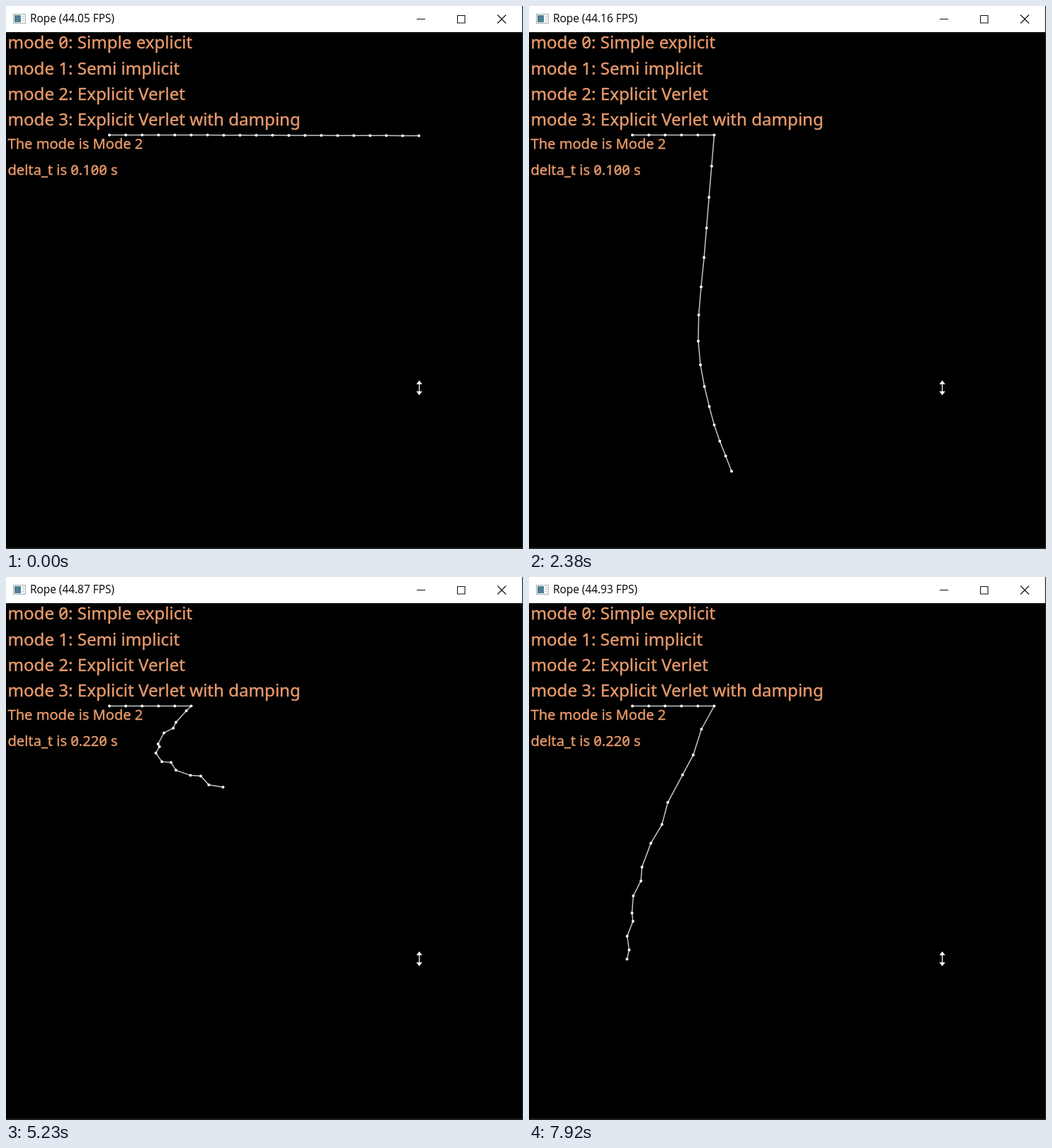
These frames come from a looping animation (730x768 px, 8 s). An HTML page:

```html
<!DOCTYPE html>
<html lang="en">
<head>
<meta charset="utf-8">
<title>Rope</title>
<style>
  html, body { margin: 0; width: 100%; height: 100%; overflow: hidden; background: #000; }
  svg { display: block; }
  text { white-space: pre; }
  .title { font: 15.4px "Open Sans", sans-serif; fill: #000; }
  .osd {
    font-family: "Noto Sans", sans-serif; font-variant-numeric: slashed-zero;
    fill: #ea9b6c; stroke: #ea9b6c; stroke-width: 0.35;
  }
  .big { font-size: 24.1px; }
  .small { font-size: 20.1px; }
</style>
</head>
<body>
<svg width="730" height="768" viewBox="0 0 730 768">
  <rect width="730" height="768"/>
  <rect width="729" height="37" fill="#fff"/>
  <path d="M729.5 0V768M0 767H730" fill="none" stroke="#2b2b2b" stroke-width="1.5"/>

  <rect x="10.5" y="11.5" width="17" height="13" fill="#f4f6f7" stroke="#a9b0b4"/>
  <rect x="12" y="13" width="9" height="10" fill="#4f7f92"/>
  <path d="M23 14.5h3M23 17.5h3M23 20.5h3" stroke="#c3c9cc"/>
  <text class="title" id="title" x="34" y="23"></text>
  <path d="M580 18.5h12M637.5 13.5h10.5v10.5h-10.5zM694 12.5l12 12M706 12.5l-12 12"
        fill="none" stroke="#111" stroke-width="1.1"/>

  <g class="osd big">
    <text x="2.5" y="60">mode 0: Simple explicit</text>
    <text x="2.5" y="96.5">mode 1: Semi implicit</text>
    <text x="2.5" y="132.7">mode 2: Explicit Verlet</text>
    <text x="2.5" y="169">mode 3: Explicit Verlet with damping</text>
  </g>
  <g class="osd small">
    <text x="2.5" y="202">The mode is Mode 2</text>
    <text id="delta" x="2.5" y="238.5"></text>
  </g>

  <path id="rope" fill="none" stroke="#bcc8c5" stroke-width="1.5"/>
  <path id="masses" fill="none" stroke="#fff" stroke-width="4" stroke-linecap="round"/>
  <path d="M583.5 532v16M580.5 534.5l3-4 3 4zM580.5 545.5l3 4 3-4z"
        fill="#fff" stroke="#fff" stroke-width="1.2"/>
</svg>

<script>
const LOOP = 8000, FPS = 13, FREE = 14;
const PIN = [261.5, 182.5];
const fixed = Array.from({ length: 5 }, (_, i) => [146 + 23.1 * i, PIN[1]]);

// Key shapes: step number, then evenly spaced points from the pin to the free end.
const poses = [
  [-1, [584, 182.5]],
  [0, [583, 183.5]],
  [13, [348, 267], [421, 283], [489, 283]],
  [22, [312, 385], [429, 431]],
  [31, [249, 335], [239, 474], [258, 580], [286, 658]],
  [44, [222, 449], [144, 648], [65, 741]],
  [57, [148, 410], [118, 598]],
  [66, [195, 262], [272, 325]],
  [80, [308, 285], [387, 341], [460, 356]],
  [84, [335, 370], [492, 425]],
  [88, [300, 440], [391, 590]],
  [97, [182, 440], [152, 672]],
  [103, [162, 407], [137, 544]],
].map(([step, ...points]) => ({ step, nodes: spread([PIN, ...points]) }));

function hermite(a, b, ta, tb, u) {
  const v = 1 - u;
  return a * v * v * (1 + 2 * u) + b * u * u * (3 - 2 * u) + ta * u * v * v - tb * u * u * v;
}

// Samples a smooth curve through the points at every free mass.
function spread(points) {
  const n = points.length - 1;
  const at = (i, axis) =>
    i < 0 ? 2 * points[0][axis] - points[1][axis] :
    i > n ? 2 * points[n][axis] - points[n - 1][axis] : points[i][axis];
  return Array.from({ length: FREE + 1 }, (_, i) => {
    const s = i / FREE * n, j = Math.min(Math.floor(s), n - 1);
    return [0, 1].map(axis => {
      const [p, a, b, q] = [-1, 0, 1, 2].map(k => at(j + k, axis));
      return hermite(a, b, (b - p) / 2, (q - a) / 2, s - j);
    });
  });
}

function velocity(k, node, axis) {
  const slope = i => (poses[i + 1].nodes[node][axis] - poses[i].nodes[node][axis]) /
                     (poses[i + 1].step - poses[i].step);
  if (k === 0) return slope(0);
  if (k === poses.length - 1) return slope(k - 1);
  const before = poses[k].step - poses[k - 1].step;
  const after = poses[k + 1].step - poses[k].step;
  return (slope(k - 1) * after + slope(k) * before) / (before + after);
}

// Each held key press makes the time step longer and the rope rougher.
const keyPresses = step => Math.max(0, Math.min(12, Math.floor((step - 44) / 1.75)));

function freeNodes(step) {
  let k = 0;
  while (k < poses.length - 2 && poses[k + 1].step <= step) k++;
  const a = poses[k], b = poses[k + 1], span = b.step - a.step;
  const u = (step - a.step) / span;
  const roughness = Math.max(0, keyPresses(step) - 7) * 0.7;
  return a.nodes.map((p, i) => [0, 1].map(axis => hermite(
    p[axis], b.nodes[i][axis],
    velocity(k, i, axis) * span, velocity(k + 1, i, axis) * span, u)
    + (i && roughness * Math.sin(2.3 * i + 1.3 * step + 2 * axis))));
}

const el = id => document.getElementById(id);

function draw(step) {
  const nodes = [...fixed, ...freeNodes(step)].map(p => p.map(v => v.toFixed(2)).join(" "));
  el("rope").setAttribute("d", "M" + nodes.join("L"));
  el("masses").setAttribute("d", nodes.map(p => `M${p}h0.01`).join(""));

  const rate = 44.05 + 1.6 * Math.sin(step * step * 1.7);
  el("title").textContent = `Rope (${rate.toFixed(2)} FPS)`;
  el("delta").textContent = `delta_t is ${(0.1 + keyPresses(step) / 100).toFixed(3)} s`;
}

const start = performance.now();
function tick() {
  const time = (performance.now() - start) % LOOP;
  // Step times are rounded down to whole hundredths of a second.
  const hundredths = Math.floor(time / 10) + 1;
  draw(Math.ceil(hundredths * FPS / 100) - 1);
  requestAnimationFrame(tick);
}
tick();
</script>
</body>
</html>
```
